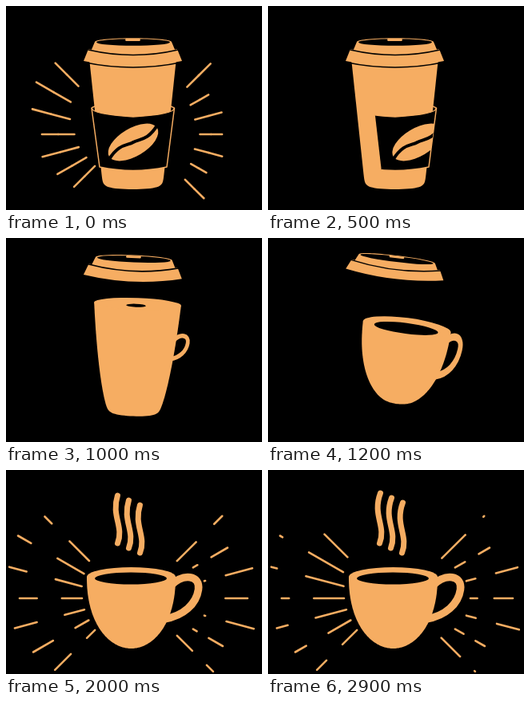
Recreate the animation shown at these times as an HTML page with a canvas. Size 320 by 256 pixels, loop 3000 ms.

```html
<!DOCTYPE html>
<html lang="en">
<head>
<meta charset="utf-8">
<title>Coffee to go, coffee to stay</title>
<style>
html, body { margin: 0; width: 100%; height: 100%; overflow: hidden; background: #000; }
canvas { display: block; }
</style>
</head>
<body>
<canvas id="stage" width="320" height="256"></canvas>
<script>
const ctx = document.getElementById('stage').getContext('2d');
const ORANGE = '#f6ad62', BLACK = '#000', LOOP = 3000;

const clamp = x => Math.max(0, Math.min(1, x));
const ramp = (t, from, to) => clamp((t - from) / (to - from));
const smooth = (t, from, to) => { const x = ramp(t, from, to); return x * x * (3 - 2 * x); };
const mix = (a, b, x) => a + (b - a) * x;

function fill(path, color = ORANGE) {
  ctx.fillStyle = color;
  ctx.fill(new Path2D(path));
}
function stroke(path, width, color = ORANGE) {
  if (width <= 0) return;
  ctx.strokeStyle = color;
  ctx.lineWidth = width;
  ctx.stroke(new Path2D(path));
}
function oval(x, y, rx, ry, color = ORANGE, angle = 0) {
  ctx.fillStyle = color;
  ctx.beginPath();
  ctx.ellipse(x, y, rx, ry, angle, 0, 7);
  ctx.fill();
}
function layer(draw) {
  ctx.save();
  draw();
  ctx.restore();
}

// Rays fan out 15 degrees apart on both sides; REACH is the outer radius, bottom to top
const REACH = {
  left: [127, 135, 145, 134, 152, 157, 145],
  right: [130, 120, 152, 139, 150, 127, 146]
};
const DASH = .52, PERIOD = .92;

function makeRay(side, reach, step) {
  const left = side === 'left', angle = step * Math.PI / 12;
  const inner = left ? 56 + 1.7 * step + .6 * step ** 2 : 86 - 2.2 * step ** 2;
  const at = u => {
    const r = mix(inner, reach, u);
    return `${left ? 151 - r * Math.cos(angle) : 167 + r * Math.cos(angle)} ${161 - r * Math.sin(angle)}`;
  };
  const phase = left ? .32 + .04 * step : .42 * Math.abs(step / 3) ** 3;
  return { at, phase };
}
const rays = Object.entries(REACH).flatMap(([side, radii]) =>
  radii.map((reach, i) => makeRay(side, reach, i - 3)));

function drawRays(t) {
  for (const { at, phase } of rays) {
    const dash = (a, b) => { if (b - a > .005) stroke(`M${at(a)}L${at(b)}`, 2.6); };
    if (t < 340) {
      // The last dash flies out and opens from its middle
      const lead = phase + .32 + t * .002, a = lead - DASH, b = Math.min(1, lead);
      const half = (b - a) / 2 * ramp(t, 350, 110);
      dash(a, a + half);
      dash(b - half, b);
    } else if (t > 1550) {
      const front = Math.min(1, (t - 1550) / 150);
      const flow = phase + (t - 2000) / 450;
      for (let k = -3; k < 4; k++) {
        const lead = flow + k * PERIOD;
        dash(Math.max(0, lead - DASH), Math.min(front, lead));
      }
    }
  }
}

// Half width of each body at depth u, from rim (0) to base (1)
const cupHalf = u => (54 - 17 * u) * Math.sqrt(1 - u ** 60);
const mugHalf = u => 55.5 * Math.sqrt(1 - u ** 2.2);

function drawBody(rim, base, morph) {
  const STEPS = 60;
  ctx.fillStyle = ORANGE;
  ctx.beginPath();
  for (let i = -STEPS; i <= STEPS; i++) {
    const u = 1 - (i / STEPS) ** 2;
    const half = mix(cupHalf(u), mugHalf(u), morph);
    ctx.lineTo(mix(158.5, 156.5, morph) + Math.sign(i) * half, mix(rim, base, u));
  }
  ctx.fill();
  oval(mix(158.5, 156.5, morph), rim, mix(54, 55.5, morph), mix(6, 12, morph));
  oval(156, rim + 2, 45 * morph, 7.5 * morph, BLACK);
}

function drawVessel(t) {
  const morph = smooth(t, 850, 1290);
  const lift = smooth(t, 900, 1180) * (1 - smooth(t, 1220, 1460));
  const grow = smooth(t, 700, 1250);
  layer(() => {
    ctx.translate(157 + 11 * lift, 173 - 16 * lift);
    ctx.rotate(.13 * lift);
    ctx.translate(-157, -173);
    if (t > 700) layer(() => {
      ctx.translate(204, mix(133, 162, morph));
      ctx.scale(grow * (1 - .38 * lift), grow);
      stroke('M2 -17C18 -33 39 -30 36.500 -12C34 6 18 21 -6 25', 9.5);
    });
    drawBody(mix(70, 134, morph), mix(230, 224, morph), morph);
  });
}

function drawSleeve(t) {
  if (t > 750) return;
  const shift = 105 * (t / 750) ** 3.3;
  const sleeve = 'M107 128Q108 136 159 139Q210 136 210.500 128L201 202Q159 211 117 202Z';
  layer(() => {
    ctx.clip(new Path2D(`M${104 + shift} 118L${115 + shift} 214H230V118Z`));
    fill(sleeve, BLACK);
    stroke(sleeve + 'M107 129Q107 127 111 126M206 126Q210 127 210.500 129', 1.5);
    ctx.clip(new Path2D(sleeve));
    ctx.translate(159 + shift, 171);
    ctx.rotate(-.54);
    oval(0, 0, 35, 17.5);
    stroke('M-37 3C-16 -8 -9 0 0 0S16 8 37 -3', 4, BLACK);
  });
}

function drawLid(t) {
  if (t > 1560) return;
  const fall = Math.max(0, (t - 1200) / 300);
  const rise = 27 * smooth(t, 850, 1080) - 6 * smooth(t, 1100, 1200);
  const tilt = smooth(t, 880, 1180);
  const size = clamp(1 - .98 * fall ** 1.5);
  layer(() => {
    ctx.translate(159 + tilt - 5 * fall, 57 - rise + 61 * fall * fall);
    ctx.rotate(.12 * tilt);
    if (fall) oval(0, 0, 3.6, 4.8, ORANGE, .3);
    ctx.scale(size, size * (1 - .17 * tilt));
    ctx.translate(-159, -57);
    fill('M111 45C112 38.500 206 38.500 207 45L212 57Q159 67 106 57Z');
    oval(159, 45.5, 46, 4.3, BLACK);
    fill('M150 41H167Q169 42.500 167 44H150Q148 42.500 150 41Z');
    fill('M103 54Q159 68 214 54L220 69Q159 82 97 69Z');
    stroke('M103 55Q159 68 215 55', 1.7, BLACK);
    stroke('M97 70.500Q159 83.500 220 70.500', 1.7 * ramp(t, 750, 500), BLACK);
  });
}

function drawSteam(t) {
  const grown = 1 - (1 - ramp(t, 1580, 2250)) ** 2.6;
  if (!grown) return;
  for (let i = 0; i < 3; i++) layer(() => {
    ctx.translate(14 * i, 6 * i);
    ctx.setLineDash([66 * grown, 100]);
    stroke('M139.500 92C148 70 130 57 140.500 29', 7);
  });
}

function draw(t) {
  ctx.fillStyle = BLACK;
  ctx.fillRect(0, 0, 320, 256);
  ctx.lineCap = ctx.lineJoin = 'round';
  drawRays(t);
  drawVessel(t);
  drawSleeve(t);
  drawLid(t);
  drawSteam(t);
}

const start = performance.now();
function tick() {
  draw((performance.now() - start) % LOOP);
  requestAnimationFrame(tick);
}
tick();
</script>
</body>
</html>
```
